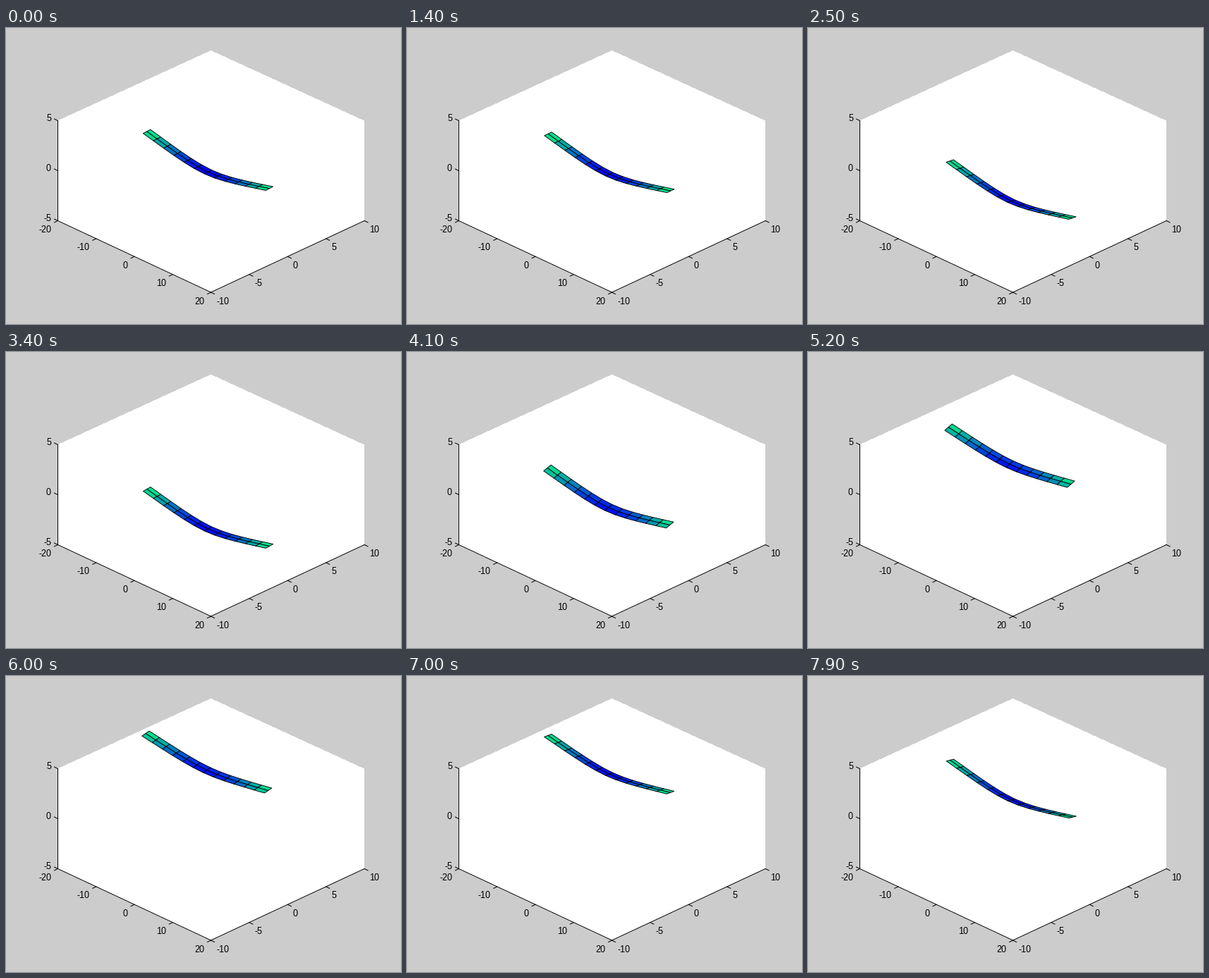
Write a matplotlib script that moves like this. It is 560 px wide and 420 px high and loops after 8000 ms.

```python
import numpy as np
import matplotlib.pyplot as plt
from matplotlib.animation import FuncAnimation
from matplotlib.collections import PolyCollection

W, H, DPI = 560, 420, 100
STEP, FRAMES = 100, 80
PX = 72 / DPI                      # one pixel in points
Z_PX = 14.2                        # pixels per unit of z

plt.rcParams["font.family"] = "Liberation Sans"
plt.rcParams["text.hinting"] = "native"
plt.rcParams["text.hinting_factor"] = 1


def project(x, y, z):
    """Axis coordinates to stage pixels."""
    px = 73 + (x + 20) * 5.43 + (y + 10) * 10.88
    py = 273.3 + (x + 20) * 2.53 - (y + 10) * 5.06 - (z + 5) * Z_PX
    return px, py


def swing(t, keys):
    """Cosine easing between (seconds, value, skew) turning points."""
    for (t0, a, _), (t1, b, skew) in zip(keys, keys[1:]):
        if t < t1:
            break
    u = min(max((t - t0) / (t1 - t0), 0), 1) ** skew
    return a + (b - a) * (1 - np.cos(np.pi * u)) / 2


# turning points of each motion, in pixels
HEIGHT = [(0.9, 186.8, 1), (3.05, 240.3, 1.25), (6.4, 118.3, 0.87), (9.9, 240.3, 1.1)]
DRIFT = [(0.9, 286, 1), (2.4, 287.5, 1), (4.1, 285.3, 1), (4.5, 281.5, 1),
         (5.1, 285.5, 1), (6, 284.3, 1), (7.9, 287.7, 1)]
PITCH = [(0.9, 0.6, 1), (2.4, -1.3, 1), (4.7, 4.7, 1), (7.9, -2.2, 1)]
BEND = [(0.9, 17, 1), (3.8, 16, 1), (5.7, 11.3, 1), (7.9, 16, 1)]

SPAN = np.abs(np.linspace(-1, 1, 13))
CHORD = np.array([0.5, 0, -0.5])   # back edge first
S, C = np.meshgrid(SPAN, CHORD)
X = np.linspace(-16, 16, 13)
MODE = S ** 2 * (6 - 4 * S + S ** 2) / 3    # cantilever deflection


def corners(a):
    return a[:-1, :-1], a[:-1, 1:], a[1:, 1:], a[1:, :-1]


def wing(t):
    """Faces of the wing, coloured blue to green by height."""
    z = (swing(t, BEND) * (MODE - 1) + swing(t, PITCH) * C) / Z_PX
    px, py = project(X, 0.95 * C, z)
    x0, y0 = project(0, 0, 0)
    pts = np.stack([px + swing(t, DRIFT) - x0, py + swing(t, HEIGHT) - y0], -1)
    quads = np.stack(corners(pts), 2).reshape(-1, 4, 2)
    level = (z - z.min()) / (z.max() - z.min())
    mean = np.mean(corners(level), axis=0).ravel()
    return quads, np.stack([0 * mean, mean, 1 - mean / 2], -1)


fig = plt.figure(figsize=(W / DPI, H / DPI), dpi=DPI, facecolor="#cccccc")
ax = fig.add_axes([0, 0, 1, 1])
ax.set_xlim(-0.5, W - 0.5)
ax.set_ylim(H - 0.5, -0.5)
ax.axis("off")


def line(*pts):
    ax.plot(*zip(*pts), color="black", lw=PX)


def label(x, y, value, side):
    ax.text(x, y + 4.5, str(value), ha=side, va="baseline", fontsize=13 * PX)


def draw_box():
    walls = [(73, 131.5), (290, 32), (507, 131.5), (507, 273), (290, 374.5), (73, 273)]
    ax.fill(*zip(*walls), color="white", lw=0, antialiased=False)
    line((73, 131), (73, 273), (290, 374.5), (507.5, 273))
    for i in range(5):
        x, y = 73 + 54.25 * i, 273 + 25.4 * i
        line((x, y), (x - 5, y + 2.4))
        label(x - 9.5, y + 12, -20 + 10 * i, "right")
        x, y = 290 + 54.4 * i, 374.6 - 25.4 * i
        line((x, y), (x + 5, y + 2.4))
        label(x + 7.5, y + 12, -10 + 5 * i, "left")
    for i in range(3):
        y = 273 - 71 * i
        line((73, y), (68, y - 2.4))
        label(63.5, y - 4, -5 + 5 * i, "right")


draw_box()
faces = PolyCollection([], edgecolors="black", linewidths=0.9 * PX, zorder=5)
ax.add_collection(faces, autolim=False)


def update(frame):
    quads, colors = wing(frame * STEP / 1000)
    faces.set_verts(quads)
    faces.set_facecolor(colors)
    return faces,


anim = FuncAnimation(fig, update, frames=FRAMES, interval=STEP,
                     repeat=True, repeat_delay=0, blit=False)
plt.show()
```
